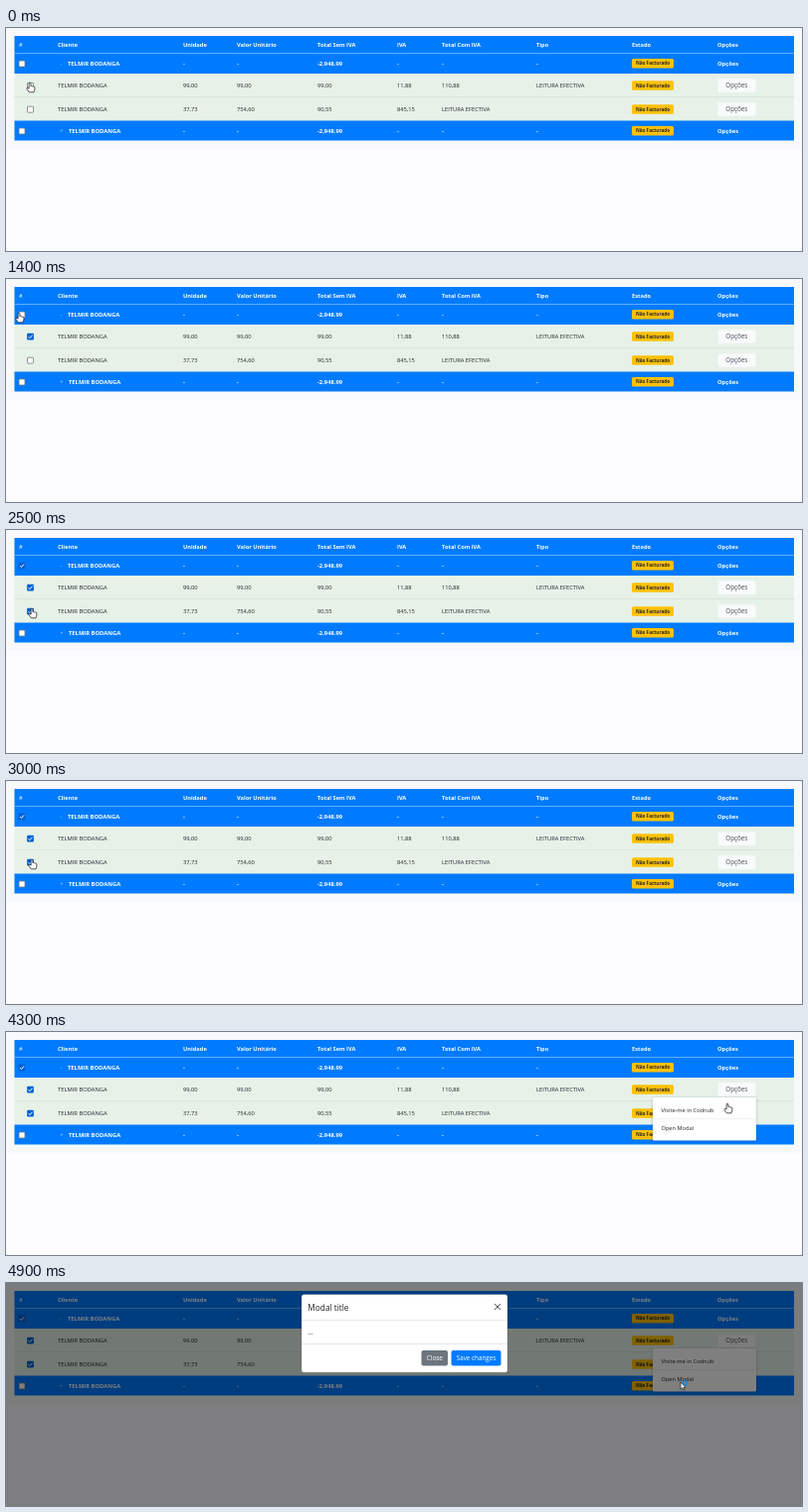
These frames come from a looping animation (800 px wide and 225 px high, 5000 ms). An HTML page with a canvas:

```html
<!DOCTYPE html>
<html lang="pt">
<head>
<meta charset="utf-8">
<title>Tabela de clientes</title>
<style>
  html, body { margin: 0; width: 100%; height: 100%; overflow: hidden; background: #fdfcff; }
  canvas { display: block; width: 800px; height: 225px; }
</style>
</head>
<body>
<canvas id="stage" width="800" height="225"></canvas>
<script>
const ctx = document.getElementById('stage').getContext('2d');
const LOOP = 5000, STEP = 100;
const FONT = '"Open Sans", "Noto Sans", sans-serif';
const BLUE = '#007bff', INK = '#212529';
const CLIENT = 'TELMIR BODANGA';
const COLS = [178, 232, 313, 393, 438, 533];

// Moments at which the state switches
const CHECK_FIRST = 400, CHECK_ALL = 1700, MENU = 4000, MODAL = 4900;

// Pointer path: time, x, y
const PATH = [
  [0, 24, 55], [600, 24, 55], [1200, 13, 34], [1800, 13, 34],
  [2400, 26, 79], [3000, 26, 79], [3500, 755, 76], [3600, 755, 76],
  [3900, 735, 57], [4100, 735, 57], [4300, 725, 72], [4400, 725, 72],
  [4800, 678, 100], [5000, 678, 100]
];

function rect(x, y, w, h, color) {
  ctx.fillStyle = color;
  ctx.fillRect(x, y, w, h);
}

function box(x, y, w, h, r, fill, stroke, line = 1) {
  ctx.beginPath();
  ctx.roundRect(x, y, w, h, r);
  ctx.fillStyle = fill;
  ctx.fill();
  if (stroke) {
    ctx.strokeStyle = stroke;
    ctx.lineWidth = line;
    ctx.stroke();
  }
}

// y is the middle of the capitals
function text(str, x, y, { size = 5.8, weight = 400, color = INK, align = 'left' } = {}) {
  ctx.font = `${weight} ${size}px ${FONT}`;
  ctx.textAlign = align;
  ctx.fillStyle = color;
  ctx.fillText(str, x, y + size * 0.36);
}

function bold(str, x, y, size = 5.8) {
  text(str, x, y, { size, weight: 700, color: '#fff' });
}

function checkbox(cx, cy, checked) {
  const x = cx - 3, y = cy - 3;
  if (!checked) {
    box(x, y, 6, 6, 0.8, '#fff', '#767676', 0.8);
    return;
  }
  box(x - 0.4, y - 0.4, 6.8, 6.8, 1, '#0560d0');
  ctx.beginPath();
  ctx.moveTo(cx - 2, cy + 0.1);
  ctx.lineTo(cx - 0.6, cy + 1.5);
  ctx.lineTo(cx + 2.1, cy - 1.6);
  ctx.strokeStyle = '#fff';
  ctx.lineWidth = 1;
  ctx.stroke();
}

function badge(y) {
  box(629, y - 4.7, 42, 9.4, 1.5, '#ffc107');
  text('Não Facturado', 650, y, { size: 4.65, weight: 700, align: 'center' });
}

function optionsButton(y) {
  box(715.5, y - 7, 38, 14, 1.5, '#f9fafb', '#edf1ee', 0.8);
  text('Opções', 734.3, y, { size: 6.3, color: '#495057', align: 'center' });
}

function groupRow(top, height, y, indent, mark, checked) {
  rect(8.5, top, 783.5, height, BLUE);
  checkbox(16, y + 0.3, checked);
  text(mark, 54.5, y, { size: 5, color: '#cfe5ff' });
  bold(CLIENT, indent, y);
  ['-', '-', '-2,948.99', '-', '-', '-'].forEach((s, i) => bold(s, COLS[i], y));
  badge(y);
  bold('Opções', 715, y);
}

function dataRow(top, height, y, values, checked) {
  rect(8.5, top, 783.5, height, '#e6f2e8');
  checkbox(24.5, y + 0.2, checked);
  text(CLIENT, 52, y);
  values.forEach((s, i) => text(s, COLS[i], y, { size: 5.75 }));
  badge(y);
  optionsButton(y);
}

function table(t) {
  rect(0, 0, 800, 225, '#fdfcff');
  rect(0, 0, 800, 122, '#f8f9fa');
  rect(8.5, 8, 783.5, 17, BLUE);
  text('#', 13, 17, { color: '#fff', size: 5.6 });
  bold('Cliente', 52, 17, 5.7);
  ['Unidade', 'Valor Unitário', 'Total Sem IVA', 'IVA', 'Total Com IVA', 'Tipo']
    .forEach((s, i) => bold(s, COLS[i], 17, 5.7));
  bold('Estado', 629, 17, 5.7);
  bold('Opções', 715, 17, 5.7);

  const all = t >= CHECK_ALL;
  groupRow(25, 21, 35.7, 62, '-', all);
  rect(8.5, 25, 783.5, 0.8, '#79b9ff');
  dataRow(46, 24, 58, ['99,00', '99,00', '99,00', '11,88', '110,88', 'LEITURA EFECTIVA'], t >= CHECK_FIRST);
  dataRow(70, 23.5, 82, ['37,73', '754,60', '90,55', '845,15', 'LEITURA EFECTIVA'], all);
  rect(8.5, 69.2, 783.5, 0.8, '#d6e2da');
  groupRow(93.5, 20, 103.7, 63, '+', false);
}

function menu() {
  ctx.save();
  ctx.shadowColor = 'rgba(0,0,0,.25)';
  ctx.shadowBlur = 3;
  ctx.shadowOffsetY = 0.5;
  box(650, 66, 104, 43.5, 1.5, '#fff');
  ctx.restore();
  rect(650, 87.3, 104, 0.8, '#e9ecef');
  text('Visite-me in Codnub', 658.5, 79, { size: 5.65 });
  text('Open Modal', 658.5, 97, { size: 5.65 });
}

function modal() {
  rect(0, 0, 800, 225, 'rgba(0,0,0,.5)');
  box(297, 11.5, 207, 78.7, 2.5, '#fff', 'rgba(0,0,0,.25)', 0.6);
  text('Modal title', 303.3, 25, { size: 8.3 });
  ctx.beginPath();
  ctx.moveTo(491, 21);
  ctx.lineTo(497, 27);
  ctx.moveTo(497, 21);
  ctx.lineTo(491, 27);
  ctx.strokeStyle = '#444';
  ctx.lineWidth = 0.9;
  ctx.stroke();
  rect(297, 37, 207, 0.8, '#dee2e6');
  rect(297, 61, 207, 0.8, '#dee2e6');
  text('...', 303.3, 49.5, { size: 6.3 });
  box(417.5, 68, 26.5, 15.6, 2, '#6c757d');
  box(447.5, 68, 50, 15.6, 2, BLUE);
  text('Close', 430.8, 76, { size: 6.4, color: '#fff', align: 'center' });
  text('Save changes', 472.5, 76, { size: 6.3, color: '#fff', align: 'center' });
}

function outline(d, x, y) {
  ctx.save();
  ctx.translate(x, y);
  const shape = new Path2D(d);
  ctx.fillStyle = '#fff';
  ctx.fill(shape);
  ctx.strokeStyle = '#222';
  ctx.lineWidth = 0.75;
  ctx.lineJoin = 'round';
  ctx.stroke(shape);
  ctx.restore();
}

function arrow(x, y) {
  outline('M0 0V7.2L1.7 5.7L2.9 8.2L4 7.7L2.9 5.3H5Z', x, y);
}

function hand(x, y) {
  outline('M-.9 .7Q0-.5 .9 .7V3.6Q1.8 2.9 2.4 3.8Q3.3 3.3 3.8 4.2Q4.8 4 4.9 5V7L4 9.8H-.8L-3.1 6.3Q-3.2 5-2 5.2L-.9 6.2Z', x, y);
}

function pointer(t) {
  const i = PATH.findIndex((p, k) => k + 1 < PATH.length && t < PATH[k + 1][0]);
  const [t0, x0, y0] = PATH[i], [t1, x1, y1] = PATH[i + 1];
  const u = (t - t0) / (t1 - t0);
  const e = u * u * (3 - 2 * u);
  const x = x0 + (x1 - x0) * e, y = y0 + (y1 - y0) * e;
  if (t >= MODAL) {
    arrow(x, y);
    ctx.beginPath();
    ctx.arc(x + 4.5, y + 1, 2, 0, Math.PI * 2);
    ctx.strokeStyle = '#1688dc';
    ctx.lineWidth = 1.4;
    ctx.stroke();
    return;
  }
  const moving = x0 !== x1 && u > 0;
  const away = t >= 3500 && t < 3900;
  if (t < MENU && (moving || away)) arrow(x, y);
  else hand(x, y);
}

function draw(now) {
  const t = Math.floor((now % LOOP) / STEP) * STEP;
  table(t);
  if (t >= MENU) menu();
  if (t >= MODAL) modal();
  pointer(t);
}

let start;
function tick(now) {
  start ??= now;
  draw(now - start);
  requestAnimationFrame(tick);
}
draw(0);
requestAnimationFrame(tick);
</script>
</body>
</html>
```
